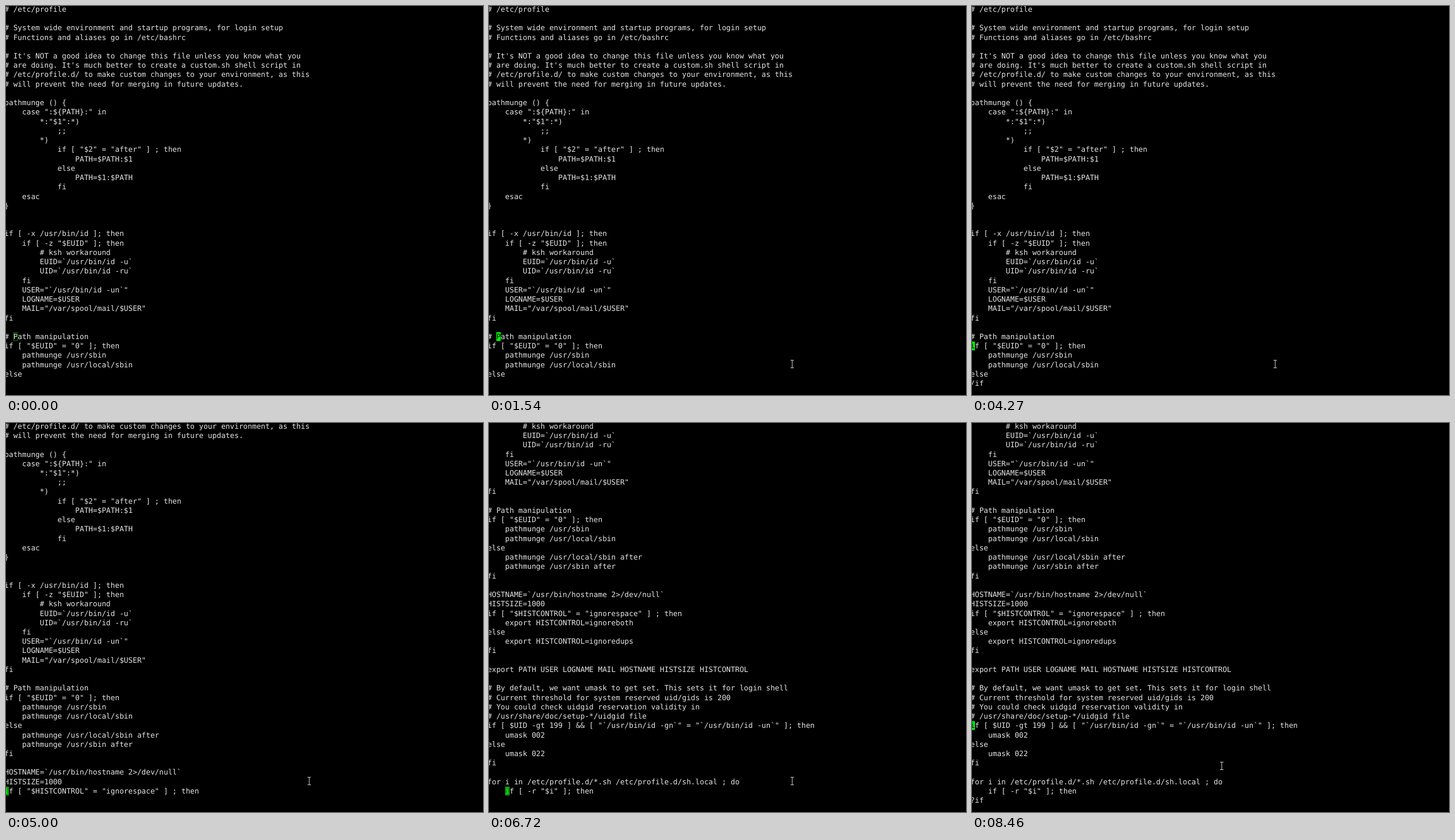
An HTML page that plays this animation: 829x675 px, repeating every 9.19 s.

```html
<!DOCTYPE html>
<html lang="en">
<head>
<meta charset="utf-8">
<title>Terminal search</title>
<style>
  html, body { margin: 0; width: 100%; height: 100%; overflow: hidden; background: #000; }
  svg { display: block; width: 829px; height: 675px; }
  text {
    font: 12.775px "DejaVu Sans Mono", monospace;
    fill: #e5e5e5;
    white-space: pre;
    text-rendering: geometricPrecision;
  }
</style>
</head>
<body>
<svg id="stage" viewBox="0 0 829 675"></svg>
<script>
const FILE = `# /etc/profile

# System wide environment and startup programs, for login setup
# Functions and aliases go in /etc/bashrc

# It's NOT a good idea to change this file unless you know what you
# are doing. It's much better to create a custom.sh shell script in
# /etc/profile.d/ to make custom changes to your environment, as this
# will prevent the need for merging in future updates.

pathmunge () {
    case ":\${PATH}:" in
        *:"$1":*)
            ;;
        *)
            if [ "$2" = "after" ] ; then
                PATH=$PATH:$1
            else
                PATH=$1:$PATH
            fi
    esac
}


if [ -x /usr/bin/id ]; then
    if [ -z "$EUID" ]; then
        # ksh workaround
        EUID=\`/usr/bin/id -u\`
        UID=\`/usr/bin/id -ru\`
    fi
    USER="\`/usr/bin/id -un\`"
    LOGNAME=$USER
    MAIL="/var/spool/mail/$USER"
fi

# Path manipulation
if [ "$EUID" = "0" ]; then
    pathmunge /usr/sbin
    pathmunge /usr/local/sbin
else
    pathmunge /usr/local/sbin after
    pathmunge /usr/sbin after
fi

HOSTNAME=\`/usr/bin/hostname 2>/dev/null\`
HISTSIZE=1000
if [ "$HISTCONTROL" = "ignorespace" ] ; then
    export HISTCONTROL=ignoreboth
else
    export HISTCONTROL=ignoredups
fi

export PATH USER LOGNAME MAIL HOSTNAME HISTSIZE HISTCONTROL

# By default, we want umask to get set. This sets it for login shell
# Current threshold for system reserved uid/gids is 200
# You could check uidgid reservation validity in
# /usr/share/doc/setup-*/uidgid file
if [ $UID -gt 199 ] && [ "\`/usr/bin/id -gn\`" = "\`/usr/bin/id -un\`" ]; then
    umask 002
else
    umask 022
fi

for i in /etc/profile.d/*.sh /etc/profile.d/sh.local ; do
    if [ -r "$i" ]; then`.split("\n");

const LOOP = 9190, ROWS = 40;
const CELL_W = 7.69, CELL_H = 16.235, LEFT = -2.7, TOP = -2.2, BASE = 12;

// Cursor looks: block fill, outline, glyph colour
const HOLLOW = ["none", "#008000", "#e5e5e5"];
const BRIGHT = ["#00ff00", "none", "#000"];
const DIM = ["#0f990f", "none", "#00ff00"];

// Screen states: start time, first line, status line, cursor row, cursor column, look
const SCREENS = [
  [0, 0, "", 35, 2, HOLLOW],
  [1540, 0, "", 35, 2, BRIGHT],
  [2600, 0, "/", 40, 1, BRIGHT],
  [3080, 0, "/i", 40, 2, BRIGHT],
  [3210, 0, "/if", 40, 3, BRIGHT],
  [4200, 0, "/if", 36, 0, DIM],
  [4270, 0, "/if", 36, 0, BRIGHT],
  [5000, 7, "", 39, 0, DIM],
  [5660, 19, "", 39, 0, DIM],
  [6720, 26, "", 39, 4, DIM],
  [7910, 26, "?if", 32, 0, BRIGHT]
];

const svg = document.getElementById("stage");
const set = (el, attrs) => {
  for (const k in attrs) el.setAttribute(k, attrs[k]);
  return el;
};
const add = (tag, attrs) =>
  svg.appendChild(set(document.createElementNS(svg.namespaceURI, tag), attrs));
const colX = c => LEFT + c * CELL_W;
const rowY = r => TOP + r * CELL_H;

add("rect", { width: 829, height: 675 });
const rows = Array.from({ length: ROWS + 1 }, (_, r) =>
  add("text", { x: LEFT, y: rowY(r) + BASE }));
const block = add("rect", {});
const glyph = add("text", {});
const pointer = add("path", {
  d: "M-3-6.5H3M0-6.5V6.5M-3 6.5H3", fill: "none", stroke: "#dcdcdc"
});

const mix = (a, b, p) => a + (b - a) * p;

// Sweep down with an overshoot, settle, then two small hops
function pointerAt(t) {
  if (t < 70) return null;
  if (t < 1410) {
    const p = Math.min(11, Math.floor((t - 70) / 68)) / 11;
    if (p < 0.8) {
      const e = p / 0.8, s = e * e * (3 - 2 * e);
      return [mix(507.5, 564.5, Math.sin(s * Math.PI / 2)), mix(80, 630, s)];
    }
    const q = (p - 0.8) / 0.2;
    return [mix(564.5, 534.5, q), mix(630, 626, q)];
  }
  if (t < 8390) return [527, 621.3];
  if (t < 8460) return [466, 604];
  return [434, 595];
}

let shown = null;

function showScreen(screen) {
  if (screen === shown) return;
  shown = screen;
  const [, first, status, row, col, [fill, stroke, ink]] = screen;
  rows.forEach((el, r) => {
    el.textContent = r < ROWS ? FILE[first + r] : status;
  });
  const inset = stroke === "none" ? 0 : 0.5;
  set(block, {
    x: colX(col) + inset, y: rowY(row) + inset,
    width: CELL_W - 2 * inset, height: CELL_H - 1 - 2 * inset, fill, stroke
  });
  set(glyph, { x: colX(col), y: rowY(row) + BASE });
  glyph.style.fill = ink;
  glyph.textContent = fill === "none" ? "" : rows[row].textContent[col] || "";
}

function render(t) {
  showScreen(SCREENS.filter(s => s[0] <= t).pop());
  const pos = pointerAt(t);
  set(pointer, pos
    ? { visibility: "visible", transform: `translate(${pos})` }
    : { visibility: "hidden" });
}

const start = performance.now();
function tick() {
  render((performance.now() - start) % LOOP);
  requestAnimationFrame(tick);
}
tick();
</script>
</body>
</html>
```
